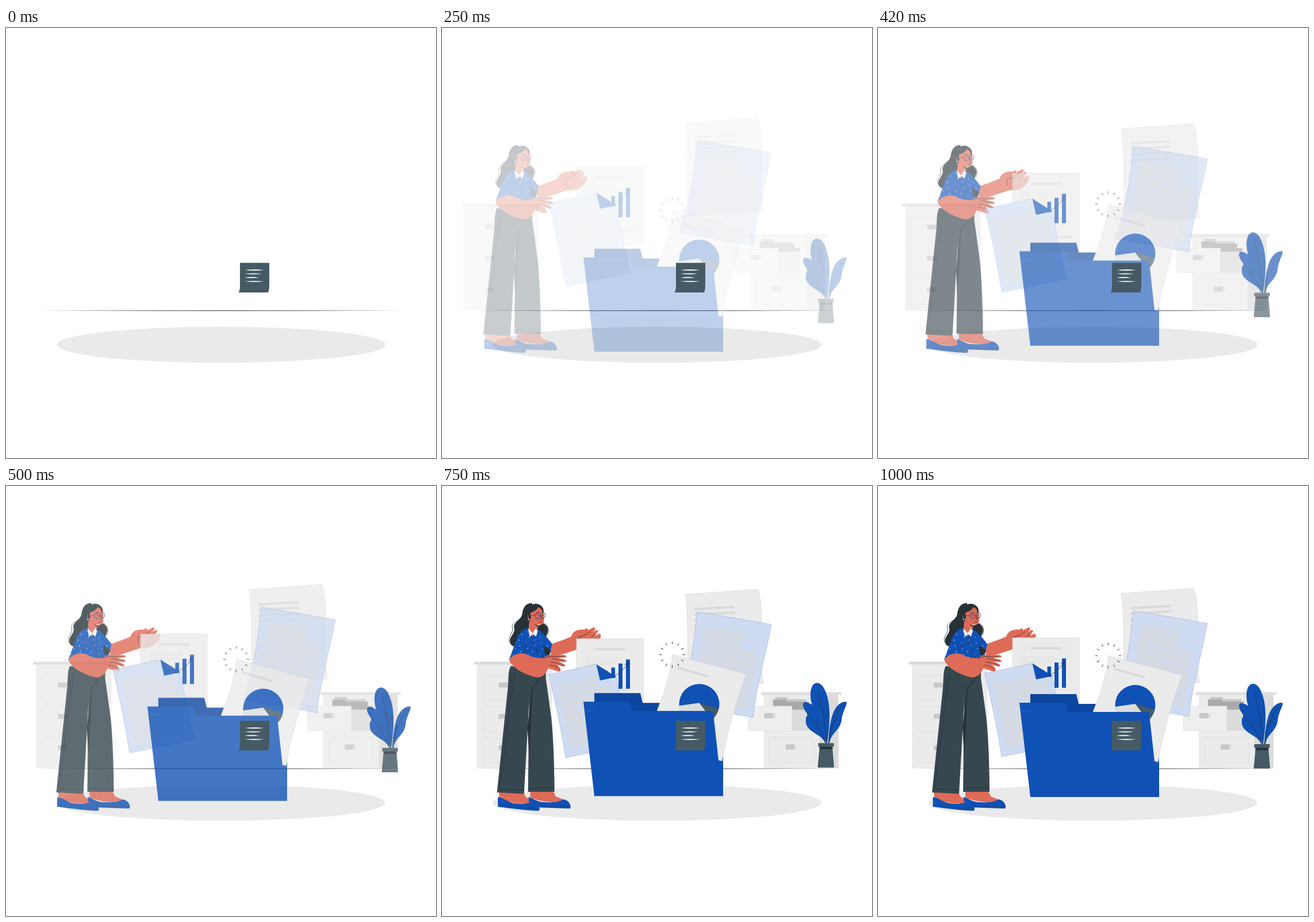
Recreate the animation shown at these times as an HTML page. Size 748x748 px, loop 1040 ms.

```html
<!DOCTYPE html>
<html lang="en">
<head>
<meta charset="utf-8">
<title>Filing documents</title>
<style>
html, body { margin: 0; width: 100%; height: 100%; overflow: hidden; background: #fff; }
svg { display: block; width: 100%; height: 100%; }
.blue { fill: #1051b5; }
.dark { fill: #263238; }
.slate { fill: #455a64; }
.skin { fill: #de6b57; }
.light { fill: #ebebeb; }
.grey { fill: #dbdbdb; }
.mid { fill: #c7c7c7; }
.line { fill: none; stroke: #263238; stroke-width: .8; stroke-linecap: round; }
.edge { fill: none; stroke: #dedede; }
.rule { fill: none; stroke: #d9d9d9; stroke-width: 4; }
.sheet { fill: #cfdbf0; stroke: #7394d2; stroke-width: .6; stroke-dasharray: 2 1; }
.page { fill: #ebebeb; stroke: #d4d4d4; stroke-width: .7; }
</style>
</head>
<body>
<svg viewBox="0 0 748 748">
  <ellipse cx="374" cy="551" rx="286" ry="31.3" fill="#eaeaea"/>
  <path d="M57 491.7Q374 490.4 691 491.7Q374 493 57 491.7" fill="#5b555c"/>

  <!-- left cabinet -->
  <g data-move="-1 0">
    <path class="light" d="M59 310H190V491H59Z"/>
    <path class="grey" d="M54 305.500H190V310.500H54Z"/>
    <path class="edge" d="M69.500 329.500H181V373H69.500ZM69.500 383.500H181V427H69.500ZM69.500 438H181V480.500H69.500Z"/>
    <path class="mid" d="M97 342h16v8.500h-16zM97 396.500h16v8.500h-16zM97 451h16v8.500h-16z"/>
  </g>

  <!-- right cabinet -->
  <g data-move="-1 0">
    <path class="light" d="M558 363H656V491H558Z"/>
    <path class="grey" d="M655 363H688V491H655Z"/>
    <path fill="#dfdfdf" d="M553 358.500H693V363.500H553Z"/>
    <path class="grey" d="M607 383H645V426H607Z"/>
    <path class="mid" d="M578 367H599L601 371H632V384H578Z"/>
    <path fill="#a9a9a9" d="M574 371.500H596L599 375H636V383H645V389H607V383H574Z"/>
    <path fill="#eee" stroke="#e0e0e0" stroke-width=".7" d="M531 383H607V426H531Z"/>
    <path class="edge" d="M568 437H645V480.500H568Z"/>
    <path class="mid" d="M559 395h15v9h-15zM596 449.500h15v9h-15z"/>
    <path class="grey" d="M574 395h4.500v8.500h-4.500zM611 449.500h3.500v8.500h-3.500z"/>
  </g>

  <!-- woman -->
  <g data-move="-1 0">
    <path class="dark" d="M155 203.500C144 203.500 139 212 138 222C136 234 121 237 124 248C126 257 114 262 117 273C119 280 127 280 132 277L152 258L174 238C180 242 185 247 182 255C180 260 180 262 179 264L160 262Z"/>
    <path class="line" d="M138 229C129 236 118 238 121 249C122 258 112 261 116 272M177 239C185 245 185 252 182 259"/>
    <path class="skin" d="M185 276C200 271 212 267 223 262C226 253 233 249 246 250C250 246 252 247 252 251L262 246C267 246 265 250 261 254L268 250C272 252 267 257 264 260L272 257C277 258 274 267 269 272C262 280 254 283 240 282C226 287 206 293 189 299Z"/>
    <path class="line" d="M236 263C235 268 237 272 236 274M236 263C243 260 250 259 256 253M259 262L264 257"/>
    <path class="skin" d="M97 533H140L144 541L158 548C142 557 110 550 98 543ZM152 531H192L196 540L211 546C199 553 171 550 152 542Z"/>
    <path class="blue" d="M149 541C157 543 164 550 177 550C190 551 201 550 210 545C218 547 222 552 222 559Q222 561 218 561L160 559L149 548Z"/>
    <path class="blue" d="M95.500 541C107 543 113 550 124 552C139 554 149 552 157 548C164 553 168 557 168 563Q168 565 163 565C143 564 119 561 95.500 558Z"/>
    <path class="line" d="M97 552C115 558 142 561 168 561M160 553C182 558 203 559 222 557" stroke-width=".5" opacity=".5"/>
    <path fill="#37474f" d="M118 313C113 322 114 336 113 350L94 533L141 535.500L150 375L148 532H194C194 490 192 430 188 400Q184 370 179 335V322Z"/>
    <path class="dark" d="M166 333C165 344 161 346 155 350L147 420L150 472L156 355Z"/>
    <path class="line" d="M119 336C118 360 113 420 98 527L142 529M149 526H193M160 345C168 343 170 337 170 331M125 325L119 369" stroke-width=".6"/>
    <path class="skin" d="M150 234L149 249L156 260L165 247L164 240Z"/>
    <path id="shirt" class="blue" d="M146 247C135 252 130 260 128 267L115 302C126 305 140 302 150 302L184 301L190 275C183 265 174 255 163 248L156 261Z"/>
    <path id="flecks" fill="none" stroke="#d5e1f6" clip-path="url(#torso)"/>
    <path class="line" d="M141 292C143 282 143 278 146 273M157 261V274L170 300" stroke-width=".6"/>
    <path class="dark" d="M177 277C174 285 176 293 183 296L188 287Z"/>
    <path fill="#f4f4f4" d="M148 247L156 256L162 247L165 252L162 262L156 257L151 263Z"/>
    <path class="skin" d="M115 302C122 292 136 289 144 292C157 299 164 300 175 299C184 291 194 293 204 294C212 293 217 296 214 298L200 299L212 302C218 305 214 307 209 306L202 305L211 310C216 314 210 315 206 313L199 311L203 316C207 321 204 324 198 322L183 317C179 327 173 333 164 333C145 330 119 316 115 302Z"/>
    <path class="line" d="M174 300C187 293 198 299 210 297M190 300C199 301 204 304 211 304M188 306C198 307 202 310 209 312M185 312C195 312 199 316 203 320"/>
    <path class="skin" d="M151 218C151 211 159 207 169 208C176 211 176 221 176 234C175 243 168 243 161 239C151 236 146 230 148 224Z"/>
    <path class="dark" d="M150 235L147 218C149 207 160 201 169 207C175 211 176 216 174 220C171 214 169 211 166 211C161 219 155 218 152 221L153 229ZM157 239C163 243 170 244 174 239L166 246Z"/>
    <g fill="none" stroke="#41508f" stroke-width="1.100">
      <circle cx="165" cy="226" r="4.600"/><circle cx="174" cy="225" r="4.300"/>
      <path d="M152 226L160 225"/>
    </g>
    <path class="line" d="M162 221L167 219M172 219H175M171 225L173 232L170 232M168 237L173 236"/>
    <circle cx="165.500" cy="225.500" r="1" class="dark"/><circle cx="173.500" cy="225" r="1" class="dark"/>
    <circle cx="149" cy="232" r="1.200" fill="#eee"/>
  </g>

  <!-- loose pages -->
  <g data-move="0 -1">
    <path class="page" d="M423 187L549 178C559 203 555 245 555 290Q555 320 559 342L428 350C426 310 430 225 423 187Z"/>
    <path class="rule" d="M439 212.500L509 208.500M439 222L510 218M439 232L510 228M439 242L510 238"/>
  </g>
  <g data-move="0 -1">
    <path class="sheet" d="M444 217L573 239C564 290 548 340 541 401L412 378C431 330 438 275 444 217Z"/>
    <path class="rule" id="rowsA" transform="translate(457 246) rotate(9.800)"/>
  </g>
  <g data-move="0 -1">
    <path class="page" d="M234 264H350V400H234Z"/>
    <path class="rule" d="M266 282.300H318M266 375H339"/>
    <path class="rule" style="stroke-width:1" d="M249 297.500H306M249 301.500H306M249 305.500H306M249 309.500H295M278 354H327" stroke-dasharray="8 1"/>
    <path class="sheet" d="M185.500 326L268.500 308.500L303 331C309 360 317 405 328 448L215 471Q204 400 185.500 326Z"/>
    <path class="rule" id="rowsB" transform="translate(202 349) rotate(-11.500)"/>
    <path class="blue" d="M282 320h6.500v10h-6.500zM294.500 314h6.500v18h-6.500zM307 307h7v44h-7zM320 300h7v51h-7z"/>
    <path class="blue" d="M268.500 308.500L303.500 330.500L275 336.500Z"/>
    <path class="line" d="M295 331Q315 322 323 307M318 309L323 306L324 312"/>
  </g>

  <!-- folder with the pie page inside -->
  <g data-move="0 1">
    <path fill="#0d46a0" d="M265 362H345L349 379H379L374 393L489 460V541H265Z"/>
    <path class="page" d="M401 295L529 329C512 375 497 425 487 481L480 479L460 420L374 393C388 360 397 328 401 295Z"/>
    <path class="rule" d="M411 318L464 333"/>
    <circle class="blue" cx="447.500" cy="381" r="35"/>
    <path fill="#dcdcdc" d="M447.500 379L412.500 384A35 35 0 0 0 470 408Z"/>
    <path class="slate" d="M447.500 379L481 389A35 35 0 0 1 470 408Z"/>
    <path class="blue" d="M246 377H326L331 393H471.500L481 479L487 480L489 520V541H265Z"/>
    <path d="M248 392H266" stroke="#4073c4" stroke-width=".6"/>
  </g>

  <!-- note -->
  <path class="slate" d="M407 408.500H458V448C458 453 457 457 456 460H404.500C407 456 407 452 407 448Z"/>
  <path id="notes" fill="#fff"/>

  <!-- plant -->
  <g data-move="0 1">
    <path class="blue" d="M668 449C663 418 640 391 641 363C642 338 660 339 667 359C677 381 675 416 670 449ZM666 448C661 432 630 430 633 408C632 402 638 402 634 396C626 386 626 376 634 378C646 380 652 392 657 402C664 416 665 430 667 448ZM672 449C673 425 676 408 681 395C687 381 697 376 703 377C707 380 696 393 695 410C691 429 678 429 674 449Z"/>
    <path class="line" d="M669 449C667 410 660 377 654 358M667 449C660 425 643 410 634 393M672 449C676 422 685 396 696 384M664 395L656 385M667 407L673 394M654 417V409M681 413L690 404" stroke-width=".7"/>
    <path class="slate" d="M654.500 449H681.500V455.500H654.500ZM657 455H679L682 491.500H653.500Z"/>
    <path class="dark" d="M657 455.500H679L679.500 459.500H656.500Z"/>
  </g>

  <g data-move="0 1"><path id="burst" class="dark"/></g>
  <clipPath id="torso"><use href="#shirt"/></clipPath>
</svg>
<script>
const $ = id => document.getElementById(id);
const range = n => [...Array(n).keys()];
const draw = (id, parts) => $(id).setAttribute('d', parts.join(''));

draw('rowsA', range(16).map(i => `M0 ${i * 8}h${i < 4 ? 68 : 97}`));
draw('rowsB', range(14).map(i => `M0 ${i * 8}h${i < 2 ? 70 : 92}`));
draw('notes', [34, 30, 25, 34].map((w, i) =>
  `M415 ${421 + i * 6.6}q${w / 2} -1.8 ${w} 0q${-w / 2} 1.8 ${-w} 0`));
draw('flecks', range(30).map(i => {
  const x = 120 + i % 6 * 12 + (i * 5) % 7, y = 254 + Math.floor(i / 6) * 10 + (i * 3) % 6;
  return `M${x} ${y}l${i % 3 * 1.6 - 1.6} ${i % 2 ? 2.4 : -1.6}`;
}));
draw('burst', range(12).map(i => {
  const a = i * Math.PI / 6, c = Math.cos(a), s = Math.sin(a);
  const at = (r, w) => `${400.5 + r * c - w * s} ${295 + r * s + w * c}`;
  return `M${at(17, 0)}Q${at(20, 1.2)} ${at(24, 0)}Q${at(20, -1.2)} ${at(17, 0)}`;
}));

// cubic-bezier(.36, -.01, .5, 1.38)
function ease(x) {
  const curve = (s, a, b) => 3 * s * (1 - s) ** 2 * a + 3 * s * s * (1 - s) * b + s ** 3;
  let lo = 0, hi = 1;
  for (let i = 0; i < 24; i++) {
    const s = (lo + hi) / 2;
    if (curve(s, .36, .5) < x) lo = s; else hi = s;
  }
  return curve(lo, -.01, 1.38);
}

const movers = [...document.querySelectorAll('[data-move]')].map(el => [el, ...el.dataset.move.split(' ')]);

// 24 steps a second, each posed at its middle, with an empty pause at the start
function render(now) {
  const step = Math.floor((now % 1040 + 3) / 1000 * 24);
  const p = step < 3 ? 0 : ease(Math.min(1, (step + .5) / 24));
  const off = 30 * (1 - p);
  for (const [el, dx, dy] of movers) {
    el.setAttribute('transform', `translate(${dx * off} ${dy * off})`);
    el.setAttribute('opacity', Math.min(1, p));
  }
}
function tick() {
  render(performance.now());
  requestAnimationFrame(tick);
}
tick();
</script>
</body>
</html>
```
